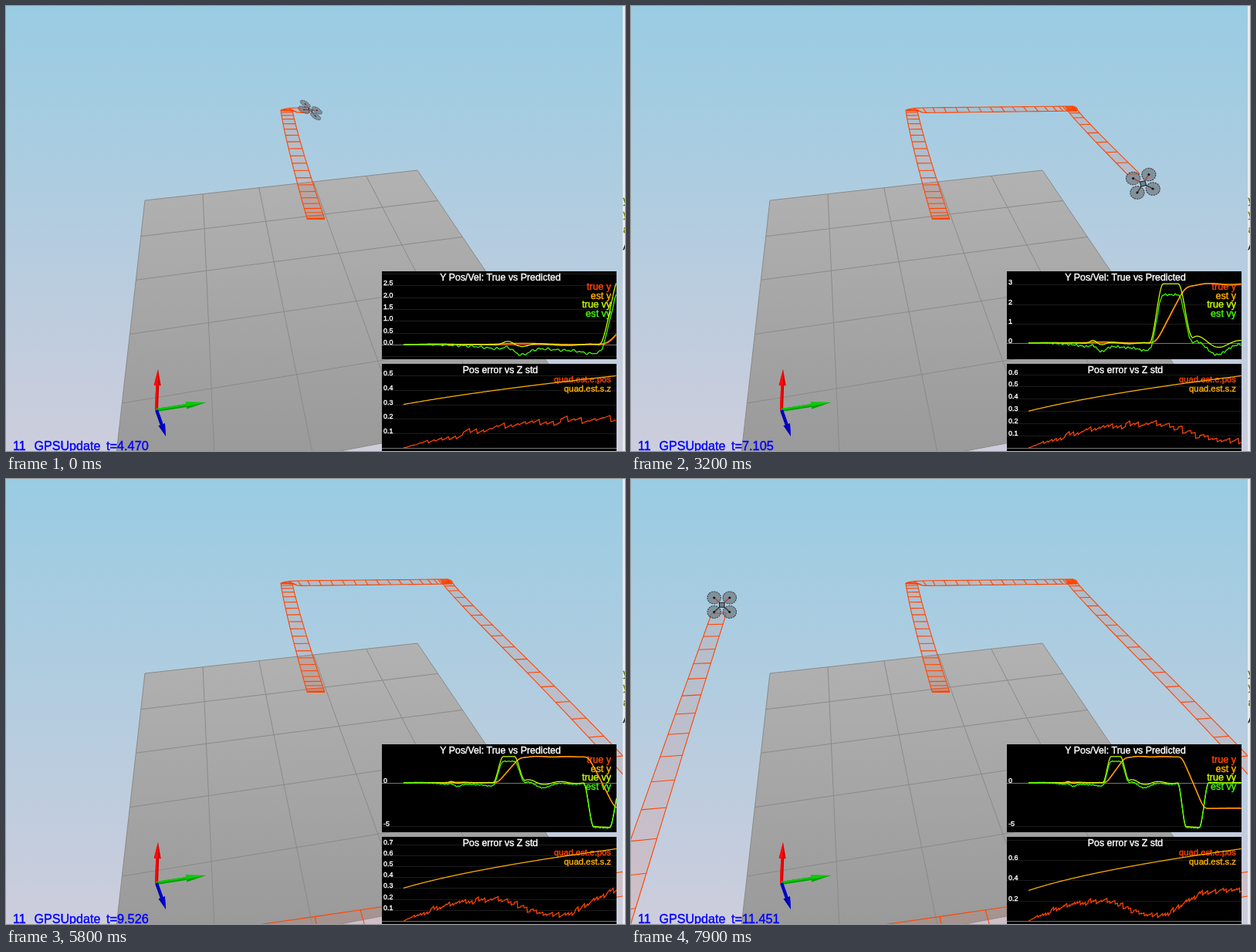
These frames come from a looping animation (802 px wide and 577 px high, 8000 ms). An HTML page with a canvas:

```html
<!DOCTYPE html>
<html lang="en">
<head>
<meta charset="utf-8">
<title>Drone flight simulation</title>
<style>
html, body { margin: 0; width: 100%; height: 100%; overflow: hidden; }
canvas { display: block; }
</style>
</head>
<body>
<canvas id="stage" width="802" height="577"></canvas>
<script>
const ctx = document.getElementById('stage').getContext('2d');
const LOOP = 8000, START = 0.2, END = 11.6, DT = 0.02;
const TRAIL_START = 1.8, RUNG = 0.07, HALF_WIDTH = 0.017;
const FONT = '"Liberation Sans", Arial, sans-serif';
const ORANGE = '#ff4500', AMBER = '#ffb000', LIME = '#ccff00', GREEN = '#44ff00';

const clamp = (v, low, high) => Math.min(high, Math.max(low, v));
const mix = (a, b, k) => a + (b - a) * k;
const ease = (t, from, to) => {
  const k = clamp((t - from) / (to - from), 0, 1);
  return k * k * (3 - 2 * k);
};
const bump = (t, centre, width) => Math.exp(-(((t - centre) / width) ** 2));
const hash = n => { const s = Math.sin(n * 127.1) * 43758.5; return s - Math.floor(s); };
// Speed profile of one flight leg: accelerate, cruise, brake
const leg = (t, start, brake) => ease(t, start, start + 0.45) * (1 - ease(t, brake, brake + 0.5));

// Perspective map of the unit square onto four corners, clockwise from top left
function perspective([x0, y0], [x1, y1], [x2, y2], [x3, y3]) {
  const sx = x0 - x1 + x2 - x3, sy = y0 - y1 + y2 - y3;
  const ax = x1 - x2, ay = y1 - y2, bx = x3 - x2, by = y3 - y2;
  const det = ax * by - bx * ay;
  const g = (sx * by - bx * sy) / det, h = (ax * sy - sx * ay) / det;
  return (u, w) => {
    const depth = 1 + g * u + h * w;
    return {
      depth,
      x: (x0 + (x1 - x0 + g * x1) * u + (x3 - x0 + h * x3) * w) / depth,
      y: (y0 + (y1 - y0 + g * y1) * u + (y3 - y0 + h * y3) * w) / depth
    };
  };
}
const ground = perspective([180, 252], [533, 213], [740, 519], [137, 633]);
const airspace = perspective([126, 138], [571, 133], [925, 505], [-45, 651]);

// Simulation time for a moment of the loop; the picture advances in 100 ms steps
const CLOCK = [[100, 4.47], [1000, 5.225], [2300, 6.25], [4000, 7.865],
  [5000, 8.795], [6600, 10.256], [7900, 11.451]];
function simTime(ms) {
  let step = Math.max(100, Math.floor(ms / 100) * 100);
  if (step > 2500 && step < 2900) step = 2500;
  const i = Math.max(1, CLOCK.findIndex(([at]) => at >= step));
  const [a, b] = [CLOCK[i - 1], CLOCK[i]];
  return mix(a[1], b[1], (step - a[0]) / (b[0] - a[0]));
}

function sideVelocity(t) {
  const idle = (0.17 * bump(t, 2.29, 0.14) - 0.1 * bump(t, 2.6, 0.16) +
    0.04 * Math.sin(5 * t) * ease(t, 0.5, 3)) * (1 - ease(t, 3.9, 4.1));
  const settle = 0.35 * ease(t, 5.2, 5.6) * Math.exp(-0.7 * (t - 5.7)) *
    Math.cos(Math.PI * (t - 5.7) / 0.7);
  return idle + settle + 3.05 * leg(t, 4.12, 5.05) - 5.15 * leg(t, 8.08, 9.22);
}
function velocityBias(t) {
  return -0.2 * ease(t, 0.8, 2.5) * (1 - 0.6 * ease(t, 6.8, 8)) - 0.15 * bump(t, 2.55, 0.25) -
    0.2 * bump(t, 3.95, 0.25) - 0.2 * bump(t, 6.2, 0.4);
}
function positionError(t) {
  const drift = 0.19 * Math.sin(Math.PI / 2 * Math.min(1, (t - START) / 4)) -
    0.145 * ease(t, 4.2, 6.6) + 0.24 * ease(t, 7, 10);
  const beat = t / 0.14, ramp = Math.min(1, t - START);
  return Math.max(0, drift + ramp * (0.045 * (hash(Math.floor(beat)) - 0.5) + 0.02 * (beat % 1)));
}

const samples = [];
for (let t = START, y = 0, w = 0; t < END; t += DT) {
  const vy = sideVelocity(t), ramp = Math.min(1, t - START);
  if (t > 4.1) y += vy * DT;
  w += 0.785 * (leg(t, 6.35, 7.6) - leg(t, 10.1, 11.35)) * DT;
  const jitter = 0.03 * Math.sin(37 * t) + 0.025 * Math.sin(61 * t + 1);
  samples.push({
    t, y, w, vy,
    estY: y + ramp * (0.03 + 0.025 * Math.sin(3 * t)),
    estVy: vy * (vy > 0 ? 0.88 : 1) + velocityBias(t) + jitter * ramp,
    std: Math.sqrt(0.09 + 0.037 * (t - START)),
    err: positionError(t)
  });
}

// Place in the air: u across, w towards the viewer, drop below cruising height
function flight(t) {
  const at = clamp((t - START) / DT, 0, samples.length - 2), i = Math.floor(at);
  const [a, b] = [samples[i], samples[i + 1]];
  return {
    u: 0.5 + mix(a.y, b.y, at - i) / 6,
    w: mix(a.w, b.w, at - i),
    drop: 1 - ease(t, 2.2, 3.75),
    push: (b.vy - a.vy) / DT
  };
}
function project(u, w, drop) {
  const p = airspace(u, w);
  return { depth: p.depth, x: p.x + 38 * drop ** 1.15, y: p.y + 141 * drop };
}
// Trail edges lie across the heading, which turns a quarter at each corner
function rung(t) {
  const { u, w, drop } = flight(t);
  const turns = [4.15, 6.15, 7.95, 9.9].reduce((n, at) => n + ease(t, at, at + 0.3), 0);
  const angle = Math.PI + turns * Math.PI / 2;
  const reach = HALF_WIDTH * (1 + 0.5 * drop);
  const du = reach * Math.cos(angle), dw = reach * Math.sin(angle);
  return [1, -1].map(side => {
    const p = project(u + side * du, w + side * dw, drop);
    return [p.x, p.y];
  });
}

function path(points, stroke, width = 1, fill) {
  ctx.beginPath();
  points.forEach(([x, y]) => ctx.lineTo(x, y));
  if (fill) { ctx.fillStyle = fill; ctx.fill(); }
  if (stroke) { ctx.strokeStyle = stroke; ctx.lineWidth = width; ctx.stroke(); }
}
function text(string, x, y, size, color, align = 'left') {
  ctx.font = `${size}px ${FONT}`;
  ctx.fillStyle = ctx.strokeStyle = color;
  ctx.lineWidth = 0.4;
  ctx.textAlign = align;
  ctx.fillText(string, x, y);
  ctx.strokeText(string, x, y);
}
function vertical(y0, y1, from, to) {
  const g = ctx.createLinearGradient(0, y0, 0, y1);
  g.addColorStop(0, from);
  g.addColorStop(1, to);
  return g;
}

function drawWorld() {
  ctx.fillStyle = vertical(0, 577, '#99cce3', '#cdcddc');
  ctx.fillRect(0, 0, 802, 577);
  const at = (u, v) => { const p = ground(u, v); return [p.x, p.y]; };
  path([at(0, 0), at(1, 0), at(1, 1), at(0, 1)], null, 0, vertical(213, 577, '#b2b2b2', '#9a9a9a'));
  for (let i = 0; i <= 5; i++) {
    path([at(i / 5, 0), at(i / 5, 1)], '#8a8a8a');
    path([at(0, i / 5), at(1, i / 5)], '#8a8a8a');
  }
}

function drawArrow(length, angle, head, light, dark) {
  ctx.save();
  ctx.translate(195, 524);
  ctx.rotate(angle);
  const neck = length - head;
  path([[0, -2], [neck, -2], [neck, 2], [0, 2]], null, 0, dark);
  path([[0, -2], [neck, -2], [neck, 0], [0, 0]], null, 0, light);
  path([[neck, -4.5], [length, 0], [neck, 4.5]], null, 0, dark);
  path([[neck, -4.5], [length, 0], [neck, 1]], null, 0, light);
  ctx.restore();
}
function drawAxes() {
  drawArrow(53, -1.533, 21, '#ff0808', '#d80000');
  drawArrow(65, -0.155, 26, '#08cc08', '#00a000');
  drawArrow(36, 1.23, 16, '#0000d8', '#0000a8');
}

function drawTrail(now) {
  const rungs = [];
  for (let t = TRAIL_START; t <= now; t += RUNG) rungs.push(rung(t));
  const outer = rungs.map(r => r[0]), inner = rungs.map(r => r[1]);
  path([...outer, ...inner.slice().reverse()], null, 0, 'rgba(225,105,80,.14)');
  [outer, inner, ...rungs].forEach(line => path(line, ORANGE, 1.1));
}

function drawDrone(now) {
  const { u, w, drop, push } = flight(now);
  const { x, y, depth } = project(u, w, drop);
  ctx.save();
  ctx.translate(x, y);
  ctx.rotate(0.08 * push);
  ctx.scale(1 / depth, Math.max(0.25, 0.92 - 0.07 * Math.abs(push)) / depth);
  ctx.rotate(-0.25 * u);
  for (let i = 0; i < 4; i++) {
    ctx.save();
    ctx.rotate(Math.PI * (i / 2 - 0.25));
    ctx.beginPath();
    ctx.arc(13.3, 0, 8.1, 0, 7);
    ctx.fillStyle = 'rgba(112,120,126,.7)';
    ctx.fill();
    ctx.setLineDash([2, 1]);
    ctx.strokeStyle = '#33383c';
    ctx.lineWidth = 1;
    ctx.stroke();
    ctx.setLineDash([]);
    path([[0, 0], [13, 0]], i % 3 ? '#3a3a3a' : '#b04030', 1.3);
    ctx.fillStyle = '#111';
    ctx.fillRect(12, -1.2, 2.5, 2.5);
    ctx.restore();
  }
  ctx.fillStyle = '#6b8296';
  ctx.fillRect(-3, -3, 6, 6);
  ctx.strokeStyle = '#222';
  ctx.lineWidth = 1;
  ctx.strokeRect(-3, -3, 6, 6);
  ctx.restore();
}

function drawChart(top, height, title, series, labelSize, now) {
  const seen = samples.filter(s => s.t <= now);
  const values = series.flatMap(({ key }) => seen.map(s => s[key]));
  const low = Math.min(0, ...values), high = Math.max(...values);
  const toX = t => 515 + (t - START) / (now - START) * 276;
  const toY = v => top + 15.5 + (high - v) / (high - low) * 93.5;
  const tick = [0.1, 0.2, 0.5, 1, 5].find(s => (high - low) / s < 6.6) || 5;

  ctx.save();
  ctx.beginPath();
  ctx.rect(487, top, 304, height);
  ctx.clip();
  ctx.fillStyle = '#000';
  ctx.fillRect(487, top, 304, height);
  for (let n = Math.ceil(low / tick) - 1; n <= high / tick + 1; n++) {
    const y = Math.round(toY(n * tick)) + 0.5;
    path([[487, y], [791, y]], n ? '#1c1c1c' : '#777');
    if (y > top + 6 && y < top + height - 5)
      text((n * tick).toFixed(tick < 1 ? 1 : 0), 489, y - 0.5, 9, '#fff');
  }
  text(title, 640.5, top + 12, 12.35, '#fff', 'center');
  series.forEach(({ label, color }, i) =>
    text(label, 784, top + 24 + i * 11.7, labelSize, color, 'right'));
  for (const { key, color } of series)
    path(seen.map(s => [toX(s.t), toY(s[key])]), color, 1.25);
  ctx.restore();
}

const motionSeries = [
  { key: 'y', label: 'true y', color: ORANGE },
  { key: 'estY', label: 'est y', color: AMBER },
  { key: 'vy', label: 'true vy', color: LIME },
  { key: 'estVy', label: 'est vy', color: GREEN }];
const errorSeries = [
  { key: 'err', label: 'quad.est.e.pos', color: ORANGE },
  { key: 'std', label: 'quad.est.s.z', color: AMBER }];

function drawStatus(now) {
  text('11', 9, 576, 16.1, '#0000ff');
  text('GPSUpdate', 36.5, 576, 16.1, '#0000ff');
  text('t=' + now.toFixed(3), 130, 576, 16.3, '#0000ff');
}
function drawEdgeStrip() {
  ctx.fillStyle = '#e9e9ee';
  ctx.fillRect(799, 0, 3, 577);
  text('y', 799.5, 256, 13, '#4c7a00');
  text('y', 799.5, 274, 13, '#7a7a00');
  text('a', 799.5, 294, 13, '#7a7a00');
  text('A', 799.5, 316, 13, '#111');
}

function draw() {
  const now = simTime(performance.now() % LOOP);
  drawWorld();
  drawAxes();
  drawTrail(now);
  drawDrone(now);
  drawChart(344, 114, 'Y Pos/Vel: True vs Predicted', motionSeries, 12.6, now);
  drawChart(464, 113, 'Pos error vs Z std', errorSeries, 11.3, now);
  drawStatus(now);
  drawEdgeStrip();
  requestAnimationFrame(draw);
}
draw();
</script>
</body>
</html>
```
